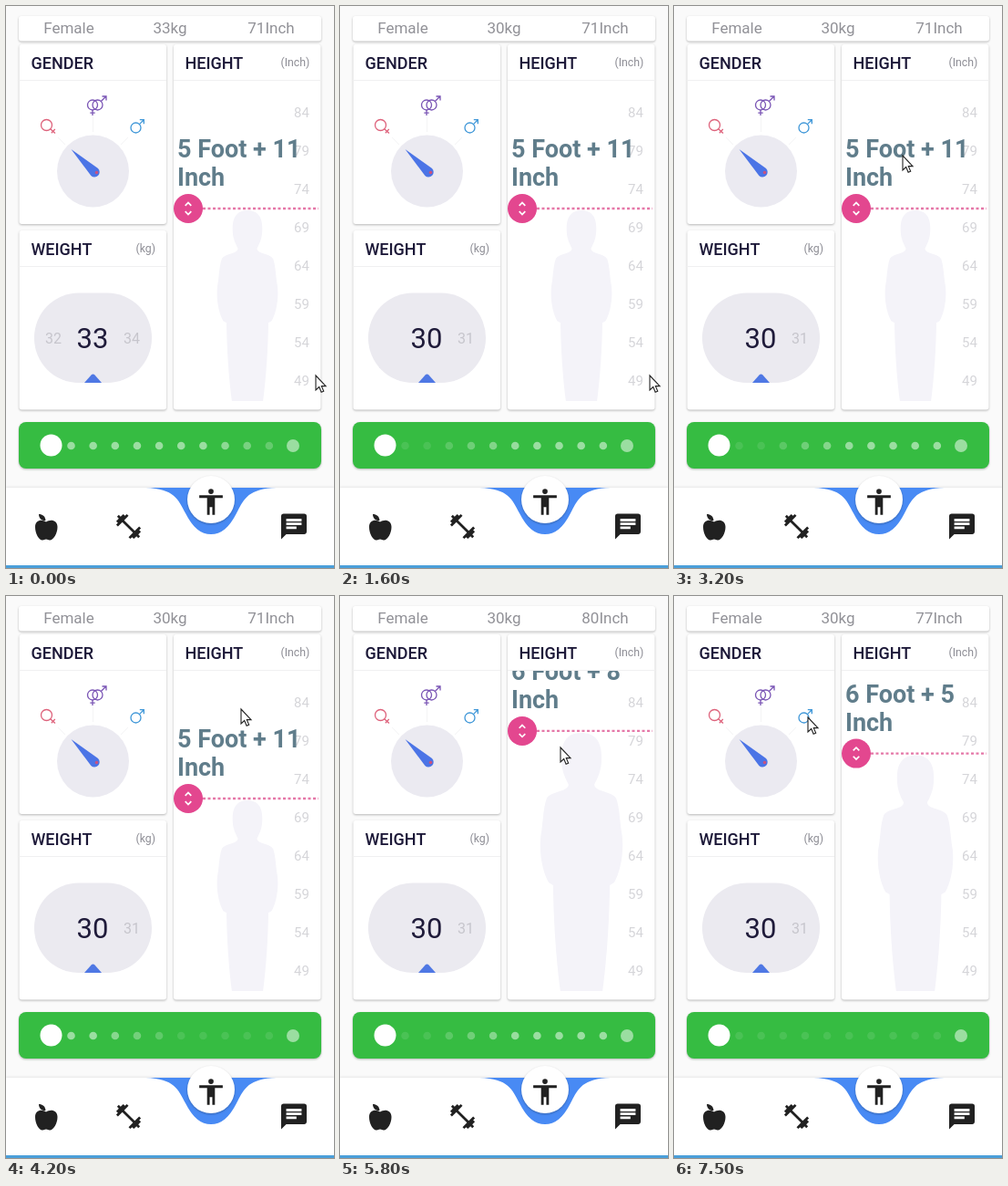
An HTML page that plays this animation: 360 px wide and 616 px high, repeating every 8000 ms.

```html
<!DOCTYPE html>
<html lang="en">
<head>
<meta charset="utf-8">
<title>Body metrics</title>
<style>
  html, body { margin: 0; width: 100%; height: 100%; overflow: hidden; background: #fafafa; }
  svg { display: block; width: 100vw; height: 100vh; font-family: Roboto, sans-serif; }
  .card { fill: #fff; filter: drop-shadow(0 1px 1.2px rgba(0, 0, 0, .27)); }
  .title { font-size: 18px; font-weight: 500; fill: #1c1838; }
  .unit { font-size: 12.3px; fill: #8d8d95; }
  .sum { font-size: 17px; fill: #919197; text-anchor: middle; }
  .mark { font-size: 15px; fill: #d5d5d9; text-anchor: middle; }
  .side { font-size: 16px; fill: #c6c5cc; text-anchor: middle; }
  .main { font-size: 31px; fill: #1f1b3a; text-anchor: middle; }
  .feet { font-size: 27px; font-weight: 700; fill: #607d8b; }
  .rule { stroke: #f0f0f1; }
  .icon { fill: #212121; }
  .line { fill: none; stroke-width: 1.3; }
</style>
</head>
<body>
<svg viewBox="0 0 360 616" preserveAspectRatio="none">
  <clipPath id="panel"><path d="M184 82H346V443H184Z"/></clipPath>
  <clipPath id="oval"><rect x="31" y="314.500" width="129" height="98.500" rx="49"/></clipPath>

  <rect class="card" x="14" y="11" width="332" height="27.500" rx="3"/>
  <rect class="card" x="14.500" y="42" width="161.500" height="197" rx="3"/>
  <rect class="card" x="14.500" y="246" width="161.500" height="196.500" rx="3"/>
  <rect class="card" x="184" y="42" width="161.500" height="400.500" rx="3"/>
  <path class="rule" d="M14.500 81.500H176M14.500 285.500H176M184 81.500H345.500"/>

  <text class="sum" x="69" y="30">Female</text>
  <text class="sum" x="180" y="30" id="sumWeight"></text>
  <text class="sum" x="291" y="30" id="sumHeight"></text>
  <text class="title" x="27.500" y="68.500">GENDER</text>
  <text class="title" x="27.500" y="272.500">WEIGHT</text>
  <text class="title" x="196.500" y="68.500">HEIGHT</text>
  <text class="unit" x="142.500" y="270">(kg)</text>
  <text class="unit" x="301.500" y="66">(Inch)</text>

  <!-- gender dial -->
  <path class="rule" d="M95.500 122V138M57 144L65 152M134 144L126 152" stroke-width=".7"/>
  <circle cx="95.500" cy="181" r="39.500" fill="#ebeaf1"/>
  <path fill="#4b74e6" d="M71.500 157L101 178A5.500 5.500 0 1 1 93.300 186Z"/>
  <circle cx="99.500" cy="182.500" r="1.800" fill="#c9527f"/>
  <g class="line" stroke="#de637c">
    <circle cx="44.500" cy="130.500" r="6"/>
    <path d="M48.700 134.700L54 139.500M53.800 135L49.800 139.300"/>
  </g>
  <g class="line" stroke="#7a55b5">
    <circle cx="95" cy="108.500" r="5.500"/><circle cx="100.500" cy="108.500" r="5.500"/>
    <path d="M104.300 104.500L109.700 99.300M105.500 99H110V103.500M95 114V120M92.300 117.200H97.700"/>
  </g>
  <g class="line" stroke="#3f97d8">
    <circle cx="142.500" cy="133.500" r="5.500"/>
    <path d="M146.400 129.600L151 125M146.800 124.700H151.300V129.200"/>
  </g>

  <!-- weight picker -->
  <rect x="31" y="314.500" width="129" height="98.500" rx="49" fill="#ebeaf0"/>
  <g id="weights" clip-path="url(#oval)"></g>
  <path fill="#4f78e4" d="M86 413L93.500 404.500Q95.500 402.500 97.500 404.500L105 413Z"/>

  <!-- height picker -->
  <g clip-path="url(#panel)">
    <path id="body" fill="#f4f3f9" d="M0 -1C.05 -1 .08 -.97 .078 -.9C.078 -.85 .06 -.82 .05 -.8
      C.05 -.77 .12 -.775 .135 -.745C.15 -.7 .147 -.66 .158 -.6C.165 -.53 .15 -.46 .127 -.42
      L.11 -.41C.108 -.28 .1 -.14 .082 0H-.082C-.1 -.14 -.108 -.28 -.11 -.41L-.127 -.42
      C-.15 -.46 -.165 -.53 -.158 -.6C-.147 -.66 -.15 -.7 -.135 -.745C-.12 -.775 -.05 -.77 -.05 -.8
      C-.06 -.82 -.078 -.85 -.078 -.9C-.08 -.97 -.05 -1 0 -1Z"/>
    <g id="marks"></g>
    <g id="slider">
      <text class="feet" x="188" y="-56" id="feet"></text>
      <text class="feet" x="188" y="-24.500">Inch</text>
      <path d="M216 0H343" stroke="#e578a8" stroke-width="2.400" stroke-dasharray="3 2.500"/>
      <circle cx="200" r="16" fill="#e3478f"/>
      <path fill="#fff" transform="translate(200 0) scale(.85) translate(-12 -12)"
        d="M12 5.830L15.170 9l1.410-1.410L12 3 7.410 7.590 8.830 9zM12 18.170L8.830 15l-1.410 1.410L12 21l4.590-4.590L15.170 15z"/>
    </g>
  </g>

  <!-- swipe button -->
  <rect class="card" x="14" y="456" width="332" height="51" rx="8" style="fill:#36bc42"/>
  <circle cx="49.500" cy="481.500" r="12" fill="#fff"/>
  <circle cx="315" cy="482" r="7" fill="#fff" opacity=".5"/>
  <g id="dots" fill="#fff"></g>

  <!-- navigation -->
  <path d="M0 528H360V616H0Z" fill="#fff" style="filter:drop-shadow(0 -1px 1px rgba(0,0,0,.08))"/>
  <path fill="#488af4" d="M153 528C185 529 189 541 197 556C205 572 214 579 225 579S245 572 253 556C261 541 265 529 297 528Z"/>
  <circle class="card" cx="225" cy="541" r="26"/>
  <g class="icon">
    <path transform="translate(225 543.500) scale(1.430) translate(-12 -12)"
      d="M12 2a2 2 0 1 1 0 4a2 2 0 1 1 0-4zm9 7h-6v13h-2v-6h-2v6H9V9H3V7h18z"/>
    <path transform="translate(134.500 570.500) scale(1.360) translate(-12 -12)"
      d="M20.570 14.860L22 13.430 20.570 12 17 15.570 8.430 7 12 3.430 10.570 2 9.140 3.430 7.710 2 5.570 4.140 4.140 2.710 2.710 4.140l1.430 1.430L2 7.710l1.430 1.430L2 10.570 3.430 12 7 8.430 15.570 17 12 20.570 13.430 22l1.430-1.430L16.290 22l2.140-2.140 1.430 1.430 1.430-1.430-1.430-1.430L22 16.290z"/>
    <path fill-rule="evenodd" transform="translate(316 570.500) scale(1.400) translate(-12 -12)"
      d="M20 2H4a2 2 0 0 0-2 2V22l4-4h14a2 2 0 0 0 2-2V4a2 2 0 0 0-2-2zM6 9h12v2H6zm8 5H6v-2h8zm4-6H6V6h12z"/>
    <path d="M44 565.500C48 562.500 56.500 562.500 56.500 571C56.500 578 52 585.500 48 585.500C46 585.500 46 584.500 44 584.500S42 585.500 40 585.500C36 585.500 32 578 32 571C32 562.500 40 562.500 44 565.500Z"/>
    <path d="M43.500 564C43 559 40 557 36 557C36 561.500 39 564.500 43.500 564Z"/>
  </g>
  <path d="M0 613H360V616H0Z" fill="#4a9fda"/>
  <path id="cursor" d="M0 0V16L3.700 12.500L6.100 18.300L8.700 17.200L6.300 11.600H11Z" fill="#fff" stroke="#222" stroke-width="1.100"/>
</svg>
<script>
const LOOP = 8000, STEP = 100, DOTS = 10, RAMP = 4;
const $ = id => document.getElementById(id);
const clamp = (v, lo = 0, hi = 1) => Math.min(hi, Math.max(lo, v));

function add(parent, tag, attrs, text = '') {
  const el = document.createElementNS('http://www.w3.org/2000/svg', tag);
  for (const key in attrs) el.setAttribute(key, attrs[key]);
  el.textContent = text;
  return parent.appendChild(el);
}

// Linear value of column `col` in rows of [time, ...values]
function track(keys, t, col = 1) {
  let i = 0;
  while (i < keys.length - 2 && t > keys[i + 1][0]) i++;
  const a = keys[i], b = keys[i + 1];
  return a[col] + (b[col] - a[col]) * clamp((t - a[0]) / (b[0] - a[0]));
}

const cursorPath = [
  [2400, 340, 405], [2600, 350, 230], [2800, 318, 24], [3000, 268, 110],
  [3200, 251, 164], [3400, 251, 166], [4200, 258, 124], [5000, 252, 130],
  [5400, 247, 143], [5800, 242, 166], [6300, 239, 178], [6900, 237, 186],
  [7000, 236, 191], [7500, 147, 133]
];
const weightPath = [[500, 33], [1000, 31], [1100, 31], [1400, 30]];

// Start and end of each sweep; they brighten and dim in turn
const sweeps = [
  [-850, 300], [1365, 2000], [2400, 2980], [2980, 3580], [4055, 4455],
  [4455, 4950], [5020, 5540], [5600, 6150], [6350, 6850], [6900, 7450]
];

for (let i = 0; i < 8; i++)
  add($('marks'), 'text', { class: 'mark', x: 324.5, y: 121.5 + i * 42 }, 84 - i * 5);

const weights = [30, 31, 32, 33, 34, 35].map(v => ({ v, el: add($('weights'), 'text', {}, v) }));
const dots = Array.from({ length: DOTS }, (_, i) =>
  add($('dots'), 'circle', { cx: 71.5 + i * 24.15, cy: 482, r: 4.3 }));

function heightAt(t) {
  if (t < 4400) return 71;
  const y = track(cursorPath, Math.min(t, 7000), 2);
  return Math.round(clamp(84 - (y - 133) / 8.23, 49, 84));
}

function drawHeight(t) {
  const h = heightAt(t), y = 115 + (84 - h) * 8.23;
  $('sumHeight').textContent = h + 'Inch';
  $('feet').textContent = `${Math.floor(h / 12)} Foot + ${h % 12}`;
  $('slider').setAttribute('transform', `translate(0 ${y})`);
  $('body').setAttribute('transform', `translate(265 433) scale(${431 - y})`);
}

function drawWeight(t) {
  const w = track(weightPath, t), chosen = Math.round(w);
  $('sumWeight').textContent = chosen + 'kg';
  for (const { v, el } of weights) {
    const main = v === chosen;
    el.setAttribute('class', main ? 'main' : 'side');
    el.setAttribute('x', 95 + (v - w) * 43);
    el.setAttribute('y', main ? 375 : 370);
  }
}

function drawDots(t) {
  let n = 0;
  while (n < sweeps.length - 1 && t >= sweeps[n + 1][0]) n++;
  const [from, to] = sweeps[n];
  const front = clamp((t - from) / (to - from)) * (DOTS + RAMP);
  dots.forEach((dot, i) => {
    const passed = clamp((front - i) / RAMP);
    dot.setAttribute('opacity', .1 + .4 * (n % 2 ? 1 - passed : passed));
  });
}

function draw() {
  const t = Math.floor(performance.now() % LOOP / STEP) * STEP;
  drawHeight(t);
  drawWeight(t);
  drawDots(t);
  $('cursor').setAttribute('transform', `translate(${track(cursorPath, t)} ${track(cursorPath, t, 2)})`);
  requestAnimationFrame(draw);
}
draw();
</script>
</body>
</html>
```
